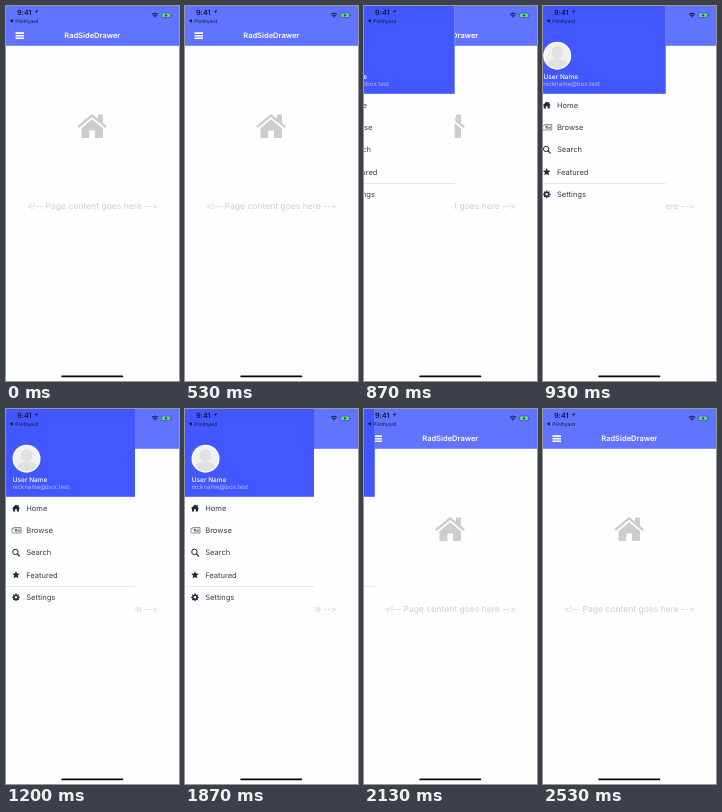
These frames come from a looping animation (173x375 px, 2590 ms). An HTML page:

```html
<!DOCTYPE html>
<html lang="en">
<head>
<meta charset="utf-8">
<title>Side drawer</title>
<style>
  html, body { margin: 0; width: 100%; height: 100%; overflow: hidden; background: #fff; }
  svg { display: block; width: 100vw; height: 100vh; }
  text {
    font-family: Inter, sans-serif;
    font-variant-ligatures: none;
    font-feature-settings: "calt" 0;
    text-rendering: geometricPrecision;
  }
  .item { font-size: 7.55px; fill: #363d4a; }
  .icons { fill: #1d2b3c; }
</style>
</head>
<body>
<svg viewBox="0 0 173 375">
  <g id="page">
    <rect width="173" height="375" fill="#fefefe"/>
    <rect width="173" height="39.8" fill="#6074ff"/>
    <path d="M9.5 27.1h8.5M9.5 29.7h8.5M9.5 32.3h8.5" stroke="#fff" stroke-width="1.6"/>
    <text x="86.3" y="32.3" font-size="7.5" font-weight="600" fill="#fff" text-anchor="middle">RadSideDrawer</text>
    <g fill="#cdcdcf">
      <path d="M86 113.3 97 122.3V131q0 1-1 1H89v-7.5H83.3V132H76.5q-1 0-1-1v-8.7z"/>
      <path d="M71.2 120.3 84.5 109q1.6-1.3 3.2 0l4.3 3.7V108.500h5v8.300l4 3.500-1.600 1.700L86 111 72.800 122z"/>
    </g>
    <text x="86.5" y="202.800" font-size="8.550" fill="#cecfd0" text-anchor="middle">&lt;!-- Page content goes here --&gt;</text>
  </g>

  <g id="drawer">
    <rect width="129" height="375" fill="#fefefe"/>
    <rect width="129" height="87.800" fill="#4257ff"/>
    <clipPath id="round"><circle cx="20.500" cy="49.700" r="12.500"/></clipPath>
    <circle cx="20.500" cy="49.700" r="14" fill="#fdfdfd"/>
    <g clip-path="url(#round)">
      <rect x="6" y="36" width="29" height="29" fill="#f1f1f1"/>
      <g fill="#e1e1e3">
        <ellipse cx="20.500" cy="46.500" rx="5.800" ry="6.500"/>
        <ellipse cx="20.500" cy="61" rx="11.500" ry="8"/>
      </g>
    </g>
    <text x="6.800" y="72.500" font-size="6.500" font-weight="500" fill="#fff">User Name</text>
    <text x="6.500" y="79.500" font-size="6.100" fill="#b5beff">nickname@box.test</text>
    <path d="M0 177.500H129" stroke="#e0e0e3" stroke-width=".7"/>
    <g class="icons">
      <path d="M10 96.800 13 99.300V102.500H10.900V100.200H9.100V102.500H7V99.300zM6 99.200 10 95.600 11.500 96.900V96H12.700V98L14 99.200 13.500 99.800 10 96.700 6.500 99.800z"/>
      <g fill="#596675">
        <path d="M7.800 118.500H15V124H6.700Q6 124 6 123.300V119.400H7.800z" fill="none" stroke="#596675" stroke-width=".7"/>
        <path d="M8.800 119.700h2.400v2h-2.400zM11.900 119.700h2.300v.6h-2.300zM11.900 121.100h2.300v.6h-2.300zM8.800 122.500h5.400v.6h-5.400z"/>
      </g>
      <g fill="none" stroke="#1d2b3c">
        <circle cx="9.400" cy="142.900" r="2.700"/>
        <path d="M11.400 144.900 13.500 147" stroke-width="1.200" stroke-linecap="round"/>
      </g>
      <path id="star"/>
      <circle cx="10" cy="188.300" r="2.100" fill="none" stroke="#1d2b3c" stroke-width="1.600"/>
      <path id="gear" stroke="#1d2b3c" stroke-width="1.300"/>
    </g>
    <g id="items"></g>
  </g>

  <g id="status" fill="#11173c">
    <text x="11" y="8.800" font-size="7.200" font-weight="600">9:41</text>
    <path d="M32.300 3.700 28.200 5.700H30.300V7.800z"/>
    <path d="M6.800 12.900V16.700L3.800 14.800z"/>
    <text x="9.300" y="16.700" font-size="4.900">Plinthyard</text>
    <path d="M145.900 8.300Q149 5.700 152.100 8.300M147.200 9.700Q149 8.200 150.800 9.700" fill="none" stroke="#11173c"/>
    <path d="M149 11.700 147.900 10.500Q149 9.800 150.100 10.500z"/>
    <rect x="155.600" y="7" width="9" height="4.600" rx="1.300" fill="none" stroke="#11173c" stroke-width=".4" opacity=".6"/>
    <rect x="156.100" y="7.500" width="8" height="3.600" rx=".8" fill="#5fdc72"/>
    <path d="M165.200 8.400q1.200.9 0 1.800zM160.700 7.500 158.500 9.600H159.900L159.300 11.200 161.500 9H160.100z"/>
  </g>
  <rect x="55.300" y="369.500" width="62" height="1.800" rx=".9" fill="#050505"/>
</svg>
<script>
  const LOOP = 2590, STEP = 200 / 3, WIDTH = 129;
  const SLIDE = 300, OPEN_AT = 680, CLOSE_AT = 1894;
  const $ = id => document.getElementById(id);

  const polar = (cx, cy, r, a) => `${cx + r * Math.sin(a)} ${cy - r * Math.cos(a)}`;
  $('star').setAttribute('d', 'M' + Array.from({ length: 10 }, (_, i) =>
    polar(10, 166, i % 2 ? 1.9 : 4.1, i * Math.PI / 5)).join('L') + 'z');
  $('gear').setAttribute('d', Array.from({ length: 8 }, (_, i) =>
    `M${polar(10, 188.3, 2.4, i * Math.PI / 4)}L${polar(10, 188.3, 3.8, i * Math.PI / 4)}`).join(''));
  $('items').innerHTML = ['Home', 'Browse', 'Search', 'Featured', 'Settings'].map((label, i) =>
    `<text class="item" x="20.2" y="${101.8 + i * 22.25}">${label}</text>`).join('');

  // Cubic ease-in-out with control points (.42, 0) and (.58, 1)
  function ease(x) {
    if (x <= 0 || x >= 1) return x <= 0 ? 0 : 1;
    let lo = 0, hi = 1;
    for (let i = 0; i < 20; i++) {
      const s = (lo + hi) / 2, r = 1 - s;
      if (1.26 * s * r * r + 1.74 * s * s * r + s ** 3 < x) lo = s; else hi = s;
    }
    return lo * lo * (3 - 2 * lo);
  }

  function draw() {
    const t = Math.floor((performance.now() % LOOP + 5) / STEP) * STEP;
    const shown = ease((t - OPEN_AT) / SLIDE) - ease((t - CLOSE_AT) / SLIDE);
    $('drawer').setAttribute('transform', `translate(${(shown - 1) * WIDTH} 0)`);
    requestAnimationFrame(draw);
  }
  draw();
</script>
</body>
</html>
```
